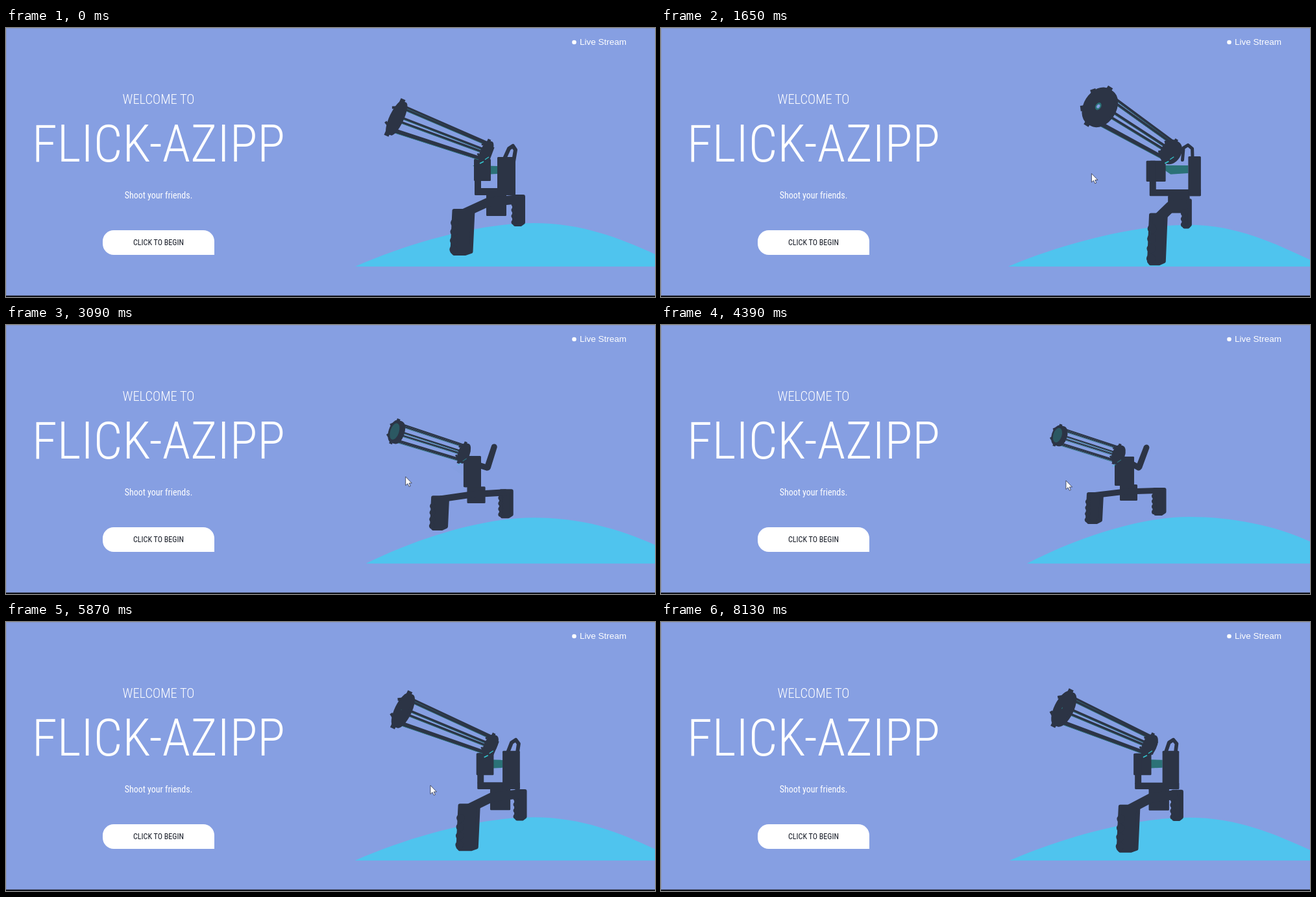
Animation of 1000x415 px, one loop 8230 ms. Source, as an HTML page:

```html
<!DOCTYPE html>
<html lang="en">
<head>
<meta charset="utf-8">
<title>Welcome</title>
<style>
html, body { margin: 0; width: 100%; height: 100%; overflow: hidden; background: #869fe2; }
svg { display: block; width: 100vw; height: 100vh; }
.narrow { font-family: 'Roboto Condensed', Roboto, 'Open Sans', sans-serif; font-stretch: 75%; text-anchor: middle; }
</style>
</head>
<body>
<svg id="stage" viewBox="0 0 1000 415">
  <rect width="1000" height="415" fill="#869fe2"/>
  <path d="M.5 413V.5H1000" fill="none" stroke="#8998c6"/>
  <g id="scene"></g>
  <g id="labels"></g>
  <path d="M166 312H304A17 17 0 0 1 321 329V350H166A17 17 0 0 1 149 333V329A17 17 0 0 1 166 312Z" fill="#fff"/>
  <g id="caption"></g>
  <circle cx="875.5" cy="22" r="3.3" fill="#fff"/>
  <text x="884" y="26" fill="#fff" font-size="13.5" font-family="'Liberation Sans', Arial, sans-serif">Live Stream</text>
  <path id="cursor" d="M0 0V13.5L3.2 10.8L5.4 15.4L7.5 14.4L5.4 10H9.6Z" fill="#fff" stroke="#39405a" stroke-width=".9"/>
  <rect y="412" width="1000" height="1" fill="#6f7fae"/>
  <rect y="413" width="1000" height="2" fill="#10131c"/>
</svg>
<script>
const LOOP = 8230, DARK = '#2c3445', TEAL = '#2b7277', SPARK = '#35c8d0', SKY = '#869fe2';
const $ = id => document.getElementById(id);

// Narrow lettering; the size gives way when the face runs wider than its column.
function label(parent, text, y, size, room, color, weight) {
  const el = document.createElementNS('http://www.w3.org/2000/svg', 'text');
  el.textContent = text;
  el.setAttribute('class', 'narrow');
  el.setAttribute('x', 235);
  el.setAttribute('fill', color);
  el.setAttribute('font-weight', weight);
  el.setAttribute('font-size', size);
  $(parent).append(el);
  const fitted = Math.min(size, size * room / el.getComputedTextLength());
  el.setAttribute('font-size', fitted);
  el.setAttribute('y', y - (size - fitted) * 0.355);
}
label('labels', 'WELCOME TO', 118, 23.5, 111, '#fff', 300);
label('labels', 'FLICK-AZIPP', 206, 79, 402, '#fff', 300);
label('labels', 'Shoot your friends.', 263, 14, 110, '#fff', 400);
label('caption', 'CLICK TO BEGIN', 336, 16, 78, '#161b26', 400);

// hill: left, top, right edge; near/far grips: x1 y1 x2 y2 width; bend: x y thickness;
// boxes: x y w h; floor: x y h; discs: x y major minor angle (+ hole, tint)
const side = {
  hill: [538, 301, 349], near: [705, 279, 702, 351, 35], far: [790, 257, 790, 306, 20],
  bend: [742, 269, 14], neck: [740, 256, 31, 34], block: [721, 202, 26, 34],
  arm: [757, 199, 28, 59], floor: [722, 247, 11],
  lever: [766, 206, 775, 186, 781, 182, 785, 188, 782, 206, 6],
  front: [599, 138, 28, 8, -65, 0, 0], rear: [737, 190, 18, 7, -66]
};
const turned = {
  hill: [535, 303, 357], near: [754, 287, 751, 365, 31], far: [806, 262, 806, 309, 17],
  bend: [780, 276, 16], neck: [774, 258, 32, 34], block: [742, 204, 30, 33],
  arm: [803, 198, 21, 60], floor: [746, 249, 9],
  lever: [796, 204, 798, 186, 806, 181, 813, 187, 813, 200, 5],
  front: [655, 123, 31, 20, -61, 0.15, 0], rear: [775, 189, 19, 13, -61]
};
const facing = {
  hill: [535, 305, 358], near: [787, 283, 784, 368, 25], far: [817, 265, 817, 310, 13],
  bend: [795, 274, 18], neck: [793, 260, 36, 15], block: [757, 206, 30, 31],
  arm: [828, 198, 17, 63], floor: [764, 249, 12],
  lever: [816, 203, 817, 183, 822, 180, 828, 185, 829, 200, 5],
  front: [705, 117, 33, 26, -52, 0.26, 0], rear: [797, 191, 20, 15, -52]
};
const profile = {
  hill: [555, 297, 339], near: [667, 263, 665, 316, 28], far: [770, 253, 770, 298, 22],
  bend: [718, 261, 10], neck: [709, 249, 28, 26], block: [704, 202, 26, 48],
  arm: [704, 202, 26, 48], floor: [704, 242, 8],
  lever: [729, 217, 740, 221, 751, 188, 751, 188, 741, 220, 9],
  front: [597, 165, 18, 9, -72, 0, 0.6], rear: [701, 197, 16, 7, -70]
};
const distant = {
  hill: [564, 296, 334], near: [669, 258, 667, 307, 26], far: [768, 251, 768, 294, 21],
  bend: [715, 257, 9], neck: [707, 246, 27, 25], block: [699, 203, 30, 44],
  arm: [699, 203, 30, 44], floor: [699, 240, 8],
  lever: [727, 215, 736, 220, 748, 189, 748, 189, 737, 219, 9],
  front: [611, 170, 16, 9, -72, 0, 0.6], rear: [702, 199, 15, 8, -70]
};

const lerp = (a, b, k) => a + (b - a) * k;
const mix = (a, b, k) => Object.fromEntries(
  Object.keys(a).map(key => [key, a[key].map((v, i) => lerp(v, b[key][i], k))]));

// time, pose, pointer x and y
const KEYS = [
  [50, side, 676, 206], [1120, turned, 669, 220], [2395, facing, 654, 232],
  [3150, profile, 615, 234], [4440, distant, 624, 240],
  [5920, mix(side, turned, 0.18), 654, 252], [8130, mix(side, turned, 0.34), 668, 262]
];

const line = (pts, width, color = DARK, extra = '') =>
  `<polyline points="${pts.map(n => n.toFixed(1))}" fill="none" stroke="${color}" stroke-width="${width.toFixed(2)}" stroke-linejoin="round" ${extra}/>`;
const box = (x, y, w, h) =>
  `<rect x="${x}" y="${y}" width="${Math.max(w, 0)}" height="${Math.max(h, 0)}" rx="1.5" fill="${DARK}"/>`;
const oval = ([x, y, a, b, turn], fill, k = 1, dx = 0, dy = 0, alpha = 1) =>
  `<ellipse rx="${a * k}" ry="${b * k}" transform="translate(${x + dx} ${y + dy}) rotate(${turn})" fill="${fill}" opacity="${alpha}"/>`;

// Point on a disc's rim
function rim([x, y, a, b, turn], phi, k) {
  const r = turn * Math.PI / 180, u = a * k * Math.cos(phi), v = b * k * Math.sin(phi);
  return [x + u * Math.cos(r) - v * Math.sin(r), y + u * Math.sin(r) + v * Math.cos(r)];
}

function hill([left, top, right]) {
  const peak = 813, w = peak - left;
  return `<path d="M${left} 368C${left + w * 0.35} ${lerp(top, 368, 0.37)} ${peak - w * 0.27} ${top} ${peak} ${top}S945 ${right - 25} 1000 ${right}V368Z" fill="#4fc4ee"/>`;
}

function grip([x1, y1, x2, y2, w], bumps) {
  const h = w / 2 - 3;
  let out = `<path d="M${x1 - h} ${y1 + 3}H${x1 + h}L${x2 + h} ${y2 - 6}L${x2 + h * 0.4} ${y2 - 3}H${x2 - h * 0.8}L${x2 - h} ${y2 - 6}Z" fill="${DARK}" stroke="${DARK}" stroke-width="6" stroke-linejoin="round"/>`;
  const r = (y2 - y1) * 0.085;
  for (let i = 0; i < bumps; i++) {
    const k = 0.3 + i * 0.19;
    out += `<circle cx="${lerp(x1, x2, k) - w / 2 + r - 1.5}" cy="${lerp(y1, y2, k)}" r="${r}" fill="${DARK}"/>`;
  }
  return out;
}

function base({ near, far, bend, neck }) {
  return grip(far, 4) + box(...neck)
    + line([near[0], near[1] + bend[2] / 2, bend[0], bend[1], far[0], far[1] + bend[2] / 2], bend[2])
    + grip(near, 4);
}

function yoke({ block, arm, floor, lever, rear, front }) {
  const [fx, fy, fh] = floor, [ax, ay, aw, ah] = arm, [rx, ry] = rear;
  const plate = [rx - 18, ry + 22, ax, ay + 14, ax, ay + 26, rx + 2, ry + 36];
  return line(lever.slice(0, 10), lever[10], DARK, 'stroke-linecap="round"')
    + `<polygon points="${plate}" fill="${TEAL}" opacity="${1 - front[6] / 0.6}"/>`
    + box(...block) + box(fx, block[1], 10, fy - block[1] + 2)
    + box(fx, fy, ax + aw - fx, fh) + box(...arm);
}

function disc(d, ux, uy, depth) {
  let out = '';
  for (let i = 0; i < 6; i++) {
    const phi = i * Math.PI / 3;
    out += line([...rim(d, phi, 0.85), ...rim(d, phi, 1.11)], d[2] * 0.27);
  }
  for (let s = depth; s >= 0; s -= 2) out += oval(d, DARK, 1, ux * s, uy * s);
  return out;
}

function barrels({ front, rear }) {
  const dx = rear[0] - front[0], dy = rear[1] - front[1], len = Math.hypot(dx, dy);
  const ux = dx / len, uy = dy / len, w = front[2] * 0.13;
  const [, , size, , , hole, tint] = front;
  let out = line([rear[0], rear[1], rear[0] + ux * size * 0.45, rear[1] + uy * size * 0.45], rear[2] * 1.2);
  for (let i = 0; i < 6; i++) {
    const phi = 0.35 + i * Math.PI / 3;
    const a = rim(front, phi, 0.82), b = rim(rear, phi, 0.82);
    out += line([...a, ...b], w)
      + line([a[0] - 0.8, a[1] + 1.5, b[0] - 0.8, b[1] + 1.5], 0.9, TEAL);
  }
  out += disc(rear, ux, uy, 5) + disc(front, ux, uy, 6);
  out += oval(front, TEAL, 0.72, 0, 0, tint);
  out += oval(front, TEAL, hole) + oval(front, SKY, Math.max(0, hole - 0.09));
  const glint = 1 - tint;
  out += line([rear[0] - 7, rear[1] + 19, rear[0] - 1, rear[1] + 16], 1.6, SPARK, `opacity="${glint}"`)
    + line([rear[0] + 1, rear[1] + 13, rear[0] + 7, rear[1] + 9], 1.2, SPARK, `opacity="${glint}"`);
  return out;
}

function draw(t) {
  let i = 0;
  while (i < KEYS.length - 2 && t >= KEYS[i + 1][0]) i++;
  const a = KEYS[i], b = KEYS[i + 1];
  const k = Math.min(1, Math.max(0, (t - a[0]) / (b[0] - a[0]))), e = k * k * (3 - 2 * k);
  const pose = mix(a[1], b[1], e);
  $('scene').innerHTML = hill(pose.hill) + base(pose) + yoke(pose) + barrels(pose);
  $('cursor').setAttribute('transform', `translate(${lerp(a[2], b[2], e)} ${lerp(a[3], b[3], e)})`);
  $('cursor').setAttribute('visibility', t > 500 && t < 7600 ? 'visible' : 'hidden');
}

const start = performance.now();
function tick() {
  draw((performance.now() - start) % LOOP);
  requestAnimationFrame(tick);
}
tick();
</script>
</body>
</html>
```
